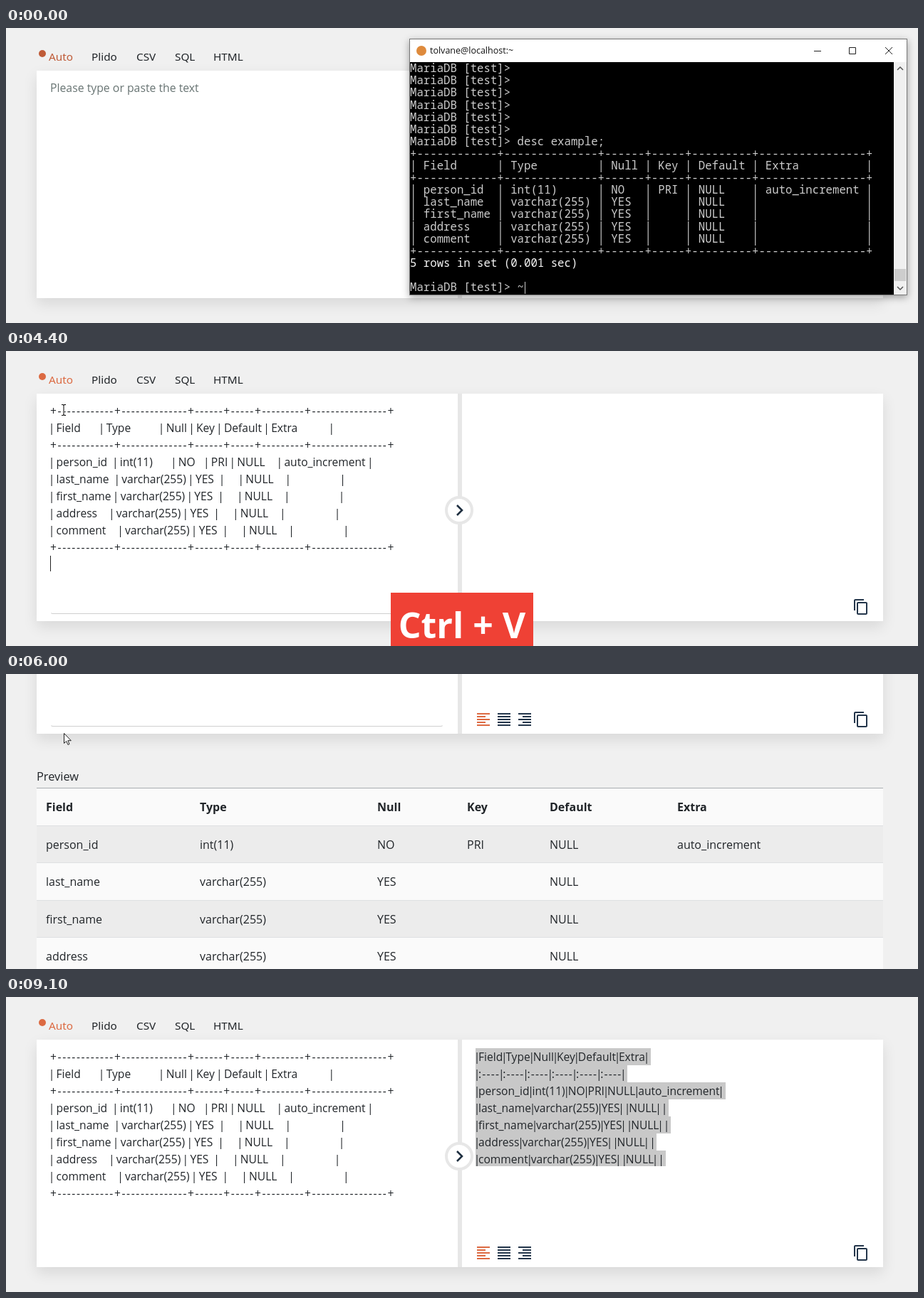
These frames come from a looping animation (1280 by 415 pixels, 9.2 s). An HTML page:

```html
<!DOCTYPE html>
<html lang="en">
<head>
<meta charset="utf-8">
<title>Table converter</title>
<style>
  html, body { margin: 0; width: 100%; height: 100%; overflow: hidden; background: #f0f0f0; }
  body { position: relative; font: 16px/24px "Open Sans", "Noto Sans", sans-serif; color: #212529; }
  body *, .abs { position: absolute; white-space: pre; }
  pre { margin: 0; font: inherit; }
  pre *, pre div { position: static; }
  #page { left: 0; top: 0; width: 1280px; height: 800px; }

  .tab { top: 28px; font: 500 15.3px/24px "Noto Sans", "Open Sans", sans-serif; }
  #dot { left: 46px; top: 31px; width: 10px; height: 10px; border-radius: 50%; background: var(--accent); }
  #panes { left: 43px; top: 60px; width: 1188px; height: 320px; background: #e7e7e7; border-radius: 3px;
    box-shadow: 0 8px 20px rgba(0, 0, 0, .1); }
  .pane { top: 0; height: 320px; background: #fff; }
  .text { font-size: 15.6px; font-weight: 500; word-spacing: .5px; }
  .text i { font-style: normal; margin: 0 -2.3px; }
  .rule { letter-spacing: 1.6px; }
  .marks { letter-spacing: 1.2px; }
  #hint { left: 62px; top: 72px; font-size: 15.8px; color: #687473; }
  #focus { left: 62px; top: 350px; width: 550px; height: 19px; border: solid transparent; border-width: 0 1px 1px;
    border-bottom-color: #cfcfcf; border-radius: 4px; }
  #caret { left: 62px; width: 1px; height: 22px; background: #222; }
  #md div { width: max-content; height: 24px; padding-right: 4px; }
  #md.on div { background: #c8c8c8; }
  #md.on div:last-child { height: 22px; }
  #knob { left: 616px; top: 204px; width: 32px; height: 32px; border: 4px solid #e7e7e7; border-radius: 50%; background: #fff; }
  svg { overflow: visible; }

  #preview { left: 43px; top: 428px; font-size: 16.4px; font-weight: 500; }
  .row { left: 43px; width: 1188px; box-sizing: border-box; border-top: 1px solid #dee0e2; line-height: 52px; background: #fafafa; }
  .row:nth-of-type(even) { background: #ececec; }
  .row.head { border-top-color: #a9adb0; font-weight: 700; }

  #term { left: 566px; top: 15px; width: 697px; height: 359px; border: 1px solid #777; background: #fff;
    box-shadow: 0 3px 10px rgba(0, 0, 0, .35); }
  #title { left: 28px; top: 4px; font-size: 12.5px; color: #111; }
  #icon { left: 9px; top: 9px; width: 14px; height: 14px; border-radius: 50%; background: #de8a3c; }
  #screen, #picked { left: 0; top: 32px; width: 679px; height: 327px; box-sizing: border-box; padding-top: .3px;
    background: #000; color: #ccc; font: 15.7px/17.1px "Noto Sans Mono", "DejaVu Sans Mono", monospace; overflow: hidden; }
  #screen b { font-weight: 400; color: #f6f6f6; }
  #picked { background: #bfbfbf; color: #000; }
  #picked b { font-weight: 400; }
  #blink { left: 161px; top: 341px; width: 1px; height: 17px; background: #ccc; }
  #bar { left: 679px; top: 32px; width: 18px; height: 327px; background: #f0f0f0; }
  #thumb { left: 1px; top: 291px; width: 16px; height: 17px; background: #cdcdcd; }

  #badge { top: 340px; width: 200px; height: 90px; background: #ef4135; color: #fff; text-align: center;
    font-weight: 700; font-size: 50px; line-height: 90px; }
  #beam { mix-blend-mode: difference; }
</style>
</head>
<body>
<div id="page">
  <div id="dot"></div>
  <div id="panes">
    <div class="pane" style="left:0;width:591px"></div>
    <div class="pane" style="left:597px;width:591px"></div>
  </div>
  <div id="hint">Please type or paste the text</div>
  <pre id="input" class="text" style="left:62px;top:72px"></pre>
  <div id="focus"></div>
  <div id="caret"></div>
  <pre id="md" class="text" style="left:659px;top:72px"></pre>
  <div id="knob"></div>
  <svg style="left:0;top:0" width="1280" height="415">
    <path d="M633 217l7 7-7 7" fill="none" stroke="#1f2f40" stroke-width="2.6"/>
    <g id="align" fill="#24364b"></g>
    <path transform="translate(1188 348)" fill="#24364b" d="M16 1H4c-1.1 0-2 .9-2 2v14h2V3h12V1zm3 4H8c-1.1 0-2 .9-2 2v14c0 1.1.9 2 2 2h11c1.1 0 2-.9 2-2V7c0-1.1-.9-2-2-2zm0 16H8V7h11v14z"/>
  </svg>
  <div id="preview">Preview</div>
  <section id="grid" style="left:0;top:0"></section>
</div>

<div id="term">
  <div id="icon"></div>
  <div id="title">tolvane@localhost:~</div>
  <svg style="left:0;top:0" width="697" height="32" fill="none" stroke="#222">
    <path d="M567 16.5h10M616.500 11.500h9v9h-9zM667 11l10 10M677 11l-10 10"/>
  </svg>
  <pre id="screen"></pre>
  <pre id="picked"></pre>
  <div id="blink"></div>
  <div id="bar">
    <div id="thumb"></div>
    <svg style="left:0;top:0" width="18" height="327" fill="none" stroke="#555" stroke-width="1.5">
      <path d="M5 11l4-4 4 4M5 316l4 4 4-4"/>
    </svg>
  </div>
</div>

<div id="badge"></div>
<svg id="beam" style="left:0;top:0" width="1" height="1" fill="none" stroke="#fff">
  <path d="M-3 -7.500h2.500l.5 1 .5-1h2.500M0 -7v14M-3 7.500h2.500l.5-1 .5 1h2.500"/>
</svg>
<svg id="arrow" style="left:0;top:0" width="1" height="1" fill="#fff" stroke="#222">
  <path d="M.5 .5v14l3.200-3 2.300 5 2-1-2.200-4.800h4.500z"/>
</svg>

<script>
const LOOP = 9200, STEP = 100;
const ROW = 17.1, CHAR = 9.42;
const $ = id => document.getElementById(id);

// table content
const rows = [
  ["Field", "Type", "Null", "Key", "Default", "Extra"],
  ["person_id", "int(11)", "NO", "PRI", "NULL", "auto_increment"],
  ...["last_name", "first_name", "address", "comment"].map(f => [f, "varchar(255)", "YES", "", "NULL", ""])
];
const widths = [10, 12, 4, 3, 7, 14];
const rule = "+" + widths.map(w => "-".repeat(w + 2) + "+").join("");
const lines = rows.map(r => "| " + r.map((c, i) => c.padEnd(widths[i])).join(" | ") + " |");
const table = [rule, lines[0], rule, ...lines.slice(1), rule];
const bars = s => s.replace(/\|/g, "<i>|</i>");

$("input").innerHTML = table
  .map(l => l === rule ? `<span class="rule">${l}</span>` : bars(l)).join("\n");

const marks = "|" + widths.map(() => '<span class="marks">:----</span>').join("|") + "|";
const md = rows.map(r => "|" + r.map(c => c || " ").join("|") + "|");
md.splice(1, 0, marks);
$("md").innerHTML = md.map(l => `<div>${bars(l)}</div>`).join("");

const prompt = "MariaDB [test]&gt;";
$("screen").innerHTML = $("picked").innerHTML = [
  ...Array(6).fill(prompt), prompt + " desc example;", ...table,
  "<b>5 rows in set (0.001 sec)</b>", "", prompt + " ~"
].join("\n");

// page furniture
[["Auto", 60], ["Plido", 120], ["CSV", 183], ["SQL", 237], ["HTML", 291]].forEach(([name, x], i) =>
  $("page").insertAdjacentHTML("beforeend",
    `<div class="tab" style="left:${x}px${i ? "" : ";color:var(--accent)"}">${name}</div>`));

const bar = (x, y, w) => `<rect x="${x}" y="${y}" width="${w}" height="2"/>`;
$("align").innerHTML = [0, 1, 2].map(k => {
  const rects = [0, 1, 2, 3, 4].map(i => {
    const w = k !== 1 && i % 2 ? 12 : 18;
    return bar(661 + k * 29 + (k === 2 ? 18 - w : 0), 351 + i * 4, w);
  }).join("");
  return `<g${k ? "" : ' style="fill:var(--accent)"'}>${rects}</g>`;
}).join("");

const columns = [56, 272, 521, 647, 763, 942];
$("grid").innerHTML = rows.map((r, i) => {
  const top = i ? 509 + Math.round((i - 1) * 52.4) : 456;
  const cells = r.map((c, k) => `<span style="left:${columns[k] - 43}px">${c}</span>`).join("");
  return `<div class="row${i ? "" : " head"}" style="top:${top}px;height:53px">${cells}</div>`;
}).join("");

// motion: [time, ...values]
const mouse = [
  [100, 562, 177], [300, 570, 178], [1000, 850, 297], [1500, 1262, 314], [1600, 1262, 314],
  [1800, 993, 236], [2800, 993, 236], [3600, 500, 152], [3900, 81, 83], [6700, 81, 83],
  [7200, 820, 320], [7600, 1200, 370], [8700, 1200, 370], [9000, 1212, 435]
];
const scroll = [[5000, 0], [5300, 221], [5500, 296], [6300, 296], [6700, 0]];

function at(track, t) {
  const n = track.findIndex(k => k[0] > t);
  if (n === 0) return track[0].slice(1);
  if (n < 0) return track[track.length - 1].slice(1);
  const a = track[n - 1], b = track[n], p = (t - a[0]) / (b[0] - a[0]);
  return a.slice(1).map((v, i) => v + (b[i + 1] - v) * p);
}

const show = (id, on) => { $(id).style.visibility = on ? "inherit" : "hidden"; };
const within = (t, from, to) => t >= from && t < to;

function select(t) {
  const [x, y] = at(mouse, Math.min(t, 1500));
  const top = 7 * ROW + .3;
  const row = Math.floor((y - 48.3) / ROW) * ROW + .3;
  const end = x > 1246 ? 679 : Math.max(0, Math.round((x - 567) / CHAR) * CHAR);
  $("picked").style.clipPath = `polygon(0 ${top}px, ${row > top + 1 ? 679 : end}px ${top}px,
    ${row > top + 1 ? 679 : end}px ${row}px, ${end}px ${row}px, ${end}px ${row + ROW}px, 0 ${row + ROW}px)`;
}

function draw(t) {
  const [x, y] = at(mouse, t), [top] = at(scroll, t);
  const pasted = t >= 4200, converted = t >= 4700;
  document.body.style.setProperty("--accent", pasted ? "#dc6a42" : "#bf5b38");
  $("page").style.transform = `translateY(${-Math.round(top)}px)`;

  show("term", t < 3900);
  show("picked", within(t, 200, 3900));
  show("blink", t < 3900 && t % 900 < 500);
  select(t);

  show("hint", !pasted);
  show("input", pasted);
  show("focus", within(t, 4000, 8200));
  show("caret", within(t, 4000, 8100) && (t < 4200 || (t - 4200) % 1060 < 530));
  $("caret").style.top = (pasted ? 288 : 73) + "px";
  show("md", converted);
  show("align", converted);
  $("md").className = t >= 8400 ? "text on" : "text";

  const copy = within(t, 2000, 2900);
  show("badge", copy || within(t, 4300, 4900));
  $("badge").style.left = (copy ? 895 : 540) + "px";
  $("badge").textContent = copy ? "Ctrl + C" : "Ctrl + V";

  const arrow = x > 1246 || y + top > 375;
  show("arrow", t >= 100 && arrow);
  show("beam", t >= 100 && !arrow);
  $(arrow ? "arrow" : "beam").style.transform = `translate(${Math.round(x)}px, ${Math.round(y)}px)`;
}

const start = performance.now();
function tick() {
  const t = (performance.now() - start) % LOOP;
  draw(Math.floor(t / STEP) * STEP);
  requestAnimationFrame(tick);
}
tick();
</script>
</body>
</html>
```
